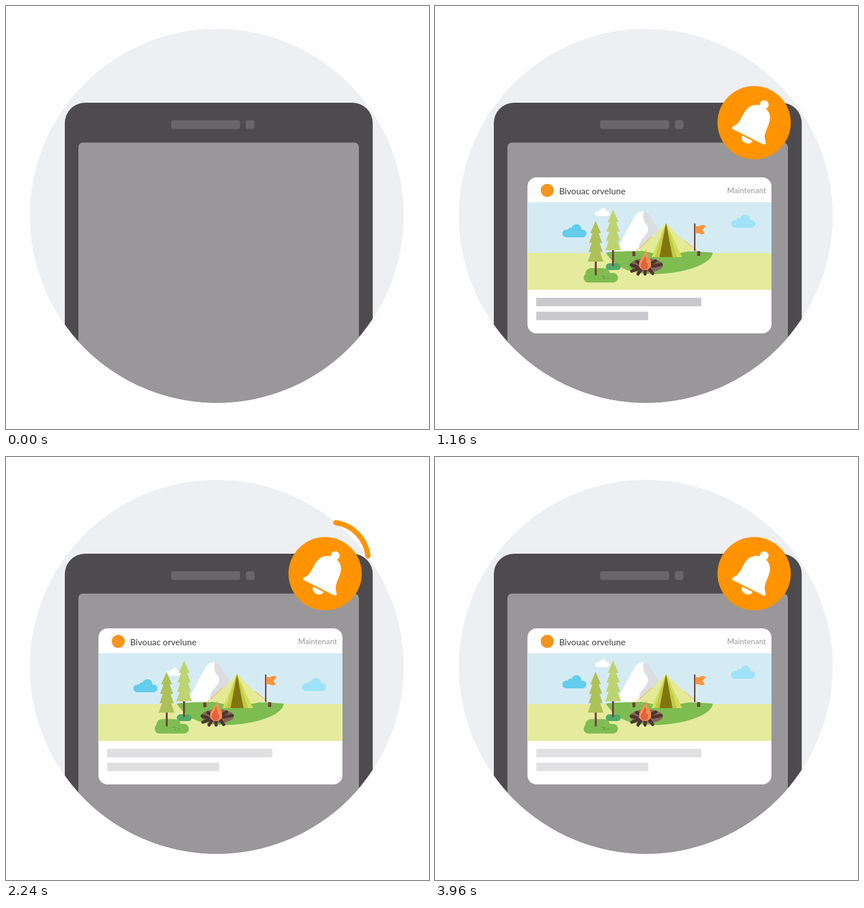
Animation of 748x748 px, one loop 4 s. Source, as an HTML page:

```html
<!DOCTYPE html>
<html lang="fr">
<head>
<meta charset="utf-8">
<title>Notification</title>
<style>
  html, body { margin: 0; width: 100%; height: 100%; overflow: hidden; background: #fefdff; }
  svg { display: block; width: 100%; height: 100%; }
  text { font-family: Lato, "Open Sans", sans-serif; }
</style>
</head>
<body>
<svg viewBox="0 0 748 748">
  <defs>
    <clipPath id="disc"><circle cx="372.7" cy="371" r="330.5"/></clipPath>
    <clipPath id="view"><rect x="163.5" y="347" width="431.5" height="155"/></clipPath>
    <path id="cloud" d="M7 24a6.5 6.5 0 0 1 0-13.5H10a5.5 5.5 0 0 1 6.5-3.5A9 9 0 0 1 34 10.5H36a6.7 6.7 0 0 1 0 13.5Z"/>
    <path id="pine" d="M0 0L9.5 22H5.5L11.5 39H7L12.5 55.500H8L14 72H-14L-8 55.500H-12.500L-7 39H-11.500L-5.500 22H-9.500Z"/>
  </defs>

  <g clip-path="url(#disc)">
    <rect width="748" height="748" fill="#edeff2"/>
    <rect x="104" y="171" width="544.5" height="700" rx="36" fill="#4d4b4d"/>
    <rect x="128" y="241.500" width="496" height="600" rx="8" fill="#999799"/>
    <g fill="#686669">
      <rect x="292" y="202" width="122" height="15.500" rx="4"/>
      <rect x="424" y="202" width="15.500" height="15.500" rx="4"/>
    </g>
  </g>

  <g id="card">
    <rect x="163.500" y="303" width="431.500" height="276" rx="16" fill="#fff"/>
    <circle cx="198.500" cy="326" r="11.500" fill="#f7941e"/>
    <text x="219.500" y="332.500" font-size="15.500" fill="#403e40">Bivouac orvelune</text>
    <text x="585.500" y="331" font-size="13.700" text-anchor="end" fill="#999799">Maintenant</text>

    <g clip-path="url(#view)">
      <rect x="163" y="347" width="433" height="91" fill="#d5ebf4"/>
      <rect x="163" y="437" width="433" height="66" fill="#e5eb9c"/>
      <use id="blue" href="#cloud" fill="#62cdec"/>
      <use id="pale" href="#cloud" fill="#9ee3f8"/>
      <use id="white" href="#cloud" fill="#fff"/>

      <!-- mountain and meadow -->
      <path d="M316 440C326 424 342 390 354 371Q359 363 367 363Q374 363 379 370L425 440Z" fill="#fff"/>
      <path d="M369 363Q376 364 380 371L425 440H368C359 430 359 420 367 411C376 402 380 394 374 386C367 379 368 371 369 363Z" fill="#dbdde0"/>
      <path d="M302 436C330 431 465 433 491 436C491 454 445 474 385 474C345 474 318 462 302 436Z" fill="#7fbc52"/>

      <!-- tent -->
      <path d="M351 438L383 408M467 436L440 414" stroke="#efc253" stroke-width="1.500"/>
      <path d="M408.500 384L361 432L386 437H432L458 432Z" fill="#e4ea96"/>
      <path d="M408.500 384L383 444H437Z" fill="#d3dd5b"/>
      <path d="M408.500 384L389 444H428Z" fill="#bfca45"/>
      <path d="M408.500 384L397 444H420Z" fill="#82750f"/>
      <g fill="#6b4236">
        <rect x="349" y="434" width="5.500" height="8.500" rx="1"/>
        <rect x="463.500" y="433.500" width="5.500" height="8.500" rx="1"/>
        <rect x="458" y="384.500" width="2.500" height="49" rx="1"/>
      </g>
      <path d="M460 388Q465 391 469 388.500T479 389L473 396L477 402Q472 405 468 402.500T460 403.500Z" fill="#f7943d"/>

      <!-- camp fire -->
      <ellipse cx="374" cy="458.500" rx="29" ry="12.500" fill="#84685a"/>
      <path d="M347 458L357 461M348 469L360 464M359 474L364 466M371.500 474V466M385 473L379 465M400 457L385 460M357 452L364 456M390 451L383 455" stroke="#4f342f" stroke-width="5.500" stroke-linecap="round"/>
      <path d="M374 429.500C373 440 360 447 361 458C361 464 366 467 371 467C379 467 383 461 382 454Q381 447 378 444Q377 447 376 448C378 441 374 438 374 429.500Z" fill="#f5924e"/>
      <path d="M371 441C371 449 363 453 364 460Q365 466 371 466Q378 465 377 457Q376 453 374 455Q375 447 371 441Z" fill="#e4603f"/>

      <!-- trees -->
      <rect x="302" y="455" width="26.500" height="12" rx="6" fill="#50aa66"/>
      <rect x="313" y="425" width="3.500" height="35" rx="1.500" fill="#754336"/>
      <use href="#pine" x="315" y="360" fill="#bed472"/>
      <path d="M271 489a8.500 8.500 0 0 1-5-15a10 10 0 0 1 10-10.500H298Q308 464 309 472H315a8.500 8.500 0 0 1 0 17Z" fill="#7fbc52"/>
      <path d="M294 478q3-1 5 1h2M297 482h4M304 481h4" fill="none" stroke="#55893a"/>
      <rect x="282.500" y="445" width="3.500" height="31.500" rx="1.500" fill="#754336"/>
      <use href="#pine" x="284" y="380" fill="#adc158"/>
    </g>

    <g id="bars">
      <rect x="179" y="516" width="292" height="15"/>
      <rect x="179" y="540.500" width="198" height="15"/>
    </g>
  </g>

  <g fill="none" stroke="#ff9400" stroke-width="9" stroke-linecap="round">
    <path class="wave" d="M583 116A67 67 0 0 1 640 175"/>
    <path class="wave" d="M583 75.500A110 110 0 0 1 678 172"/>
    <path class="wave" d="M577 29.500A170 170 0 0 1 723 179.500"/>
  </g>

  <g id="bell">
    <circle cx="564.300" cy="206.300" r="64.800" fill="#ff9400"/>
    <g transform="translate(554.500 230) rotate(26.500)" fill="#fff">
      <circle cy="-62" r="7.800"/>
      <path d="M-33 0Q-33 -3 -30 -6C-24 -13 -27 -25 -25 -37C-23 -50 -14 -58 -1 -58C12 -58 20 -50 22 -38C24 -26 22 -14 30 -6Q33 -3 33 0Q32 1.500 30 1.500H-30Q-32 1.500 -33 0Z"/>
      <path d="M-10.500 4.500H10.500A10.500 9 0 0 1 -10.500 4.500Z"/>
    </g>
  </g>
</svg>

<script>
const LOOP = 4000;
const $ = id => document.getElementById(id);
const waves = [...document.querySelectorAll('.wave')];
const ramp = (t, a, b) => Math.min(1, Math.max(0, (t - a) / (b - a)));
const ease = p => p * p * (3 - 2 * p);

// Eased value through [time, value] keys
function track(t, keys) {
  let v = keys[0][1];
  for (let i = 1; i < keys.length; i++) {
    const [a, from] = keys[i - 1], [b, to] = keys[i];
    if (t >= a) v = from + (to - from) * ease(ramp(t, a, b));
  }
  return v;
}

const clouds = [
  { id: 'blue', x: 225, y: 385, size: 1, keys: [[1160, 0], [2250, 7], [3400, -12], [3960, 0]] },
  { id: 'pale', x: 523.5, y: 368, size: 1, keys: [[1160, 0], [2300, 22], [3400, -12], [3960, 0]] },
  { id: 'white', x: 283, y: 357, size: 0.6, keys: [[1160, 0], [2300, 15.5], [3700, 0]] }
];

// Fade-in start, fade-out start of each wave within one ring
const RING = 960;
const rings = [[20, 740], [220, 640], [440, 560]];

function draw(t) {
  const open = ease(ramp(t, 440, 800));
  const wide = 1 + 0.012 * (1 - open);
  $('card').setAttribute('transform',
    `translate(379.250 320) scale(${wide} ${open}) translate(-379.250 -320)`);
  $('card').setAttribute('opacity', ramp(t, 440, 707));

  for (const c of clouds)
    $(c.id).setAttribute('transform', `translate(${c.x} ${c.y + track(t, c.keys)}) scale(${c.size})`);

  const shade = 255 - 40 - 13 * Math.cos((t - 1120) / 1800 * 2 * Math.PI);
  $('bars').setAttribute('fill', `rgb(${shade - 1},${shade - 2},${shade + 1})`);

  const pop = ease(ramp(t, 980, 1140));
  $('bell').setAttribute('transform', `translate(564.300 206.300) scale(${pop}) translate(-564.300 -206.300)`);

  const ringing = t >= 1160 && t < 1160 + 2 * RING;
  const r = (t - 1160) % RING;
  waves.forEach((w, i) => {
    const [on, off] = rings[i];
    w.setAttribute('opacity', ringing ? ramp(r, on, on + 80) - ramp(r, off, off + 80) : 0);
  });
}

const start = performance.now();
function frame() {
  draw((performance.now() - start) % LOOP);
  requestAnimationFrame(frame);
}
draw(0);
requestAnimationFrame(frame);
</script>
</body>
</html>
```
